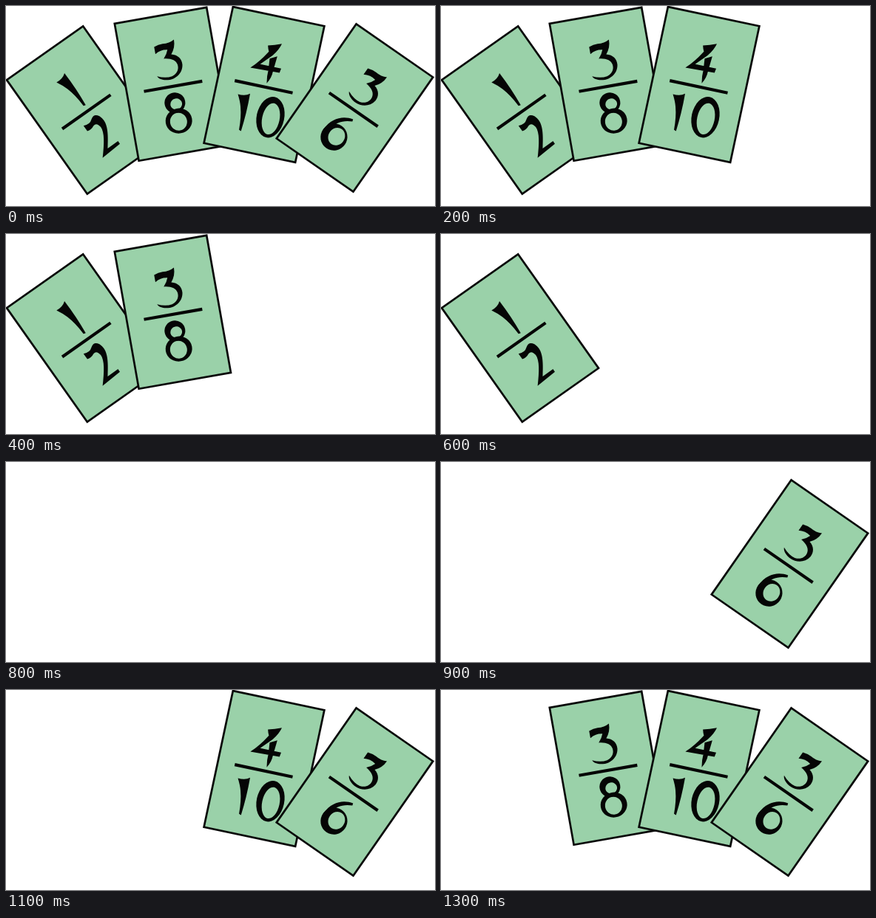
Write an HTML page with a canvas that moves like this. It is 580 px wide and 271 px high and loops after 1.5 s.

```html
<!DOCTYPE html>
<html lang="en">
<head>
<meta charset="utf-8">
<title>Fraction cards</title>
<style>
  html, body { margin: 0; width: 100%; height: 100%; overflow: hidden; background: #fff; }
  canvas { display: block; }
</style>
</head>
<body>
<canvas id="stage" width="580" height="271"></canvas>
<script>
const ctx = document.getElementById('stage').getContext('2d');
const LOOP = 1500;
const CARD_W = 126.3, CARD_H = 188.8;

// Glyph outlines in card coordinates, measured from the card centre.
const shapes = {
  one: 'M-10 -53 Q0 -52 6 -57 Q7 -30 4.5 -5 L1.5 -6 Q1 -24 -3 -37 Q-5 -44 -10 -53 Z',
  two: 'M-14 16 Q-6 20 0 15 Q7 10 11 18 C16 30 9 42 -5 60 L12 60 L12 64.5 L-18 66.5 C-5 52 4 40 4 31 Q3 22 -3 24 Q-9 27 -14 25 Z',
  three: 'M-16 -54 Q-10 -56 -4 -56 Q5 -55 12 -59 Q12 -48 5 -40 C14 -38 18 -31 17.5 -24 C16 -12 5 -6.5 -3 -6.5 C-10 -6.5 -17 -9 -19 -14 Q-8 -9 1 -10.5 C9 -13 12 -19 11 -25 C10 -31 4 -35 -6 -36 Q-1 -41 1 -47 Q-8 -49 -16 -44 Z',
  four: 'M-6 -53 Q3 -55 12 -59 Q10 -50 3 -41 L-11 -26 L18 -26 L17 -20 L-23 -18.5 Q-13 -28 -3 -45 Q-5 -49 -6 -53 Z M0 -36 L9.5 -41 L8 -20 Q8 -10 3 -2.5 Q1 -12 1.5 -20 Z',
  sixTail: 'M-18.3 48 C-18 28 -6 17 7 14 L8 17 C-2 22 -11 30 -11 46 Z'
};
const paths = Object.fromEntries(
  Object.entries(shapes).map(([name, d]) => [name, new Path2D(d)])
);

function ring(x, y, rx, ry, holeX, holeY, holeRx, holeRy) {
  ctx.beginPath();
  ctx.ellipse(x, y, rx, ry, 0, 0, Math.PI * 2);
  ctx.closePath();
  ctx.moveTo(holeX + holeRx, holeY);
  ctx.ellipse(holeX, holeY, holeRx, holeRy, 0, 0, Math.PI * 2);
  ctx.fill('evenodd');
}

function half() {
  ctx.fill(paths.one);
  ctx.fill(paths.two);
}

function threeEighths() {
  ctx.fill(paths.three);
  ring(-1.5, 25.5, 14, 14, 0, 27.5, 8, 7.5);
  ring(-0.5, 50.5, 18, 17, -1, 51.5, 11.5, 12);
}

function fourTenths() {
  ctx.fill(paths.four);
  ctx.save();
  ctx.translate(-22, 73);
  ctx.fill(paths.one);
  ctx.restore();
  ring(17.5, 41.5, 18.7, 28, 18.5, 43.5, 11.8, 21.5);
}

function threeSixths() {
  ctx.fill(paths.three);
  ctx.fill(paths.sixTail);
  ring(-0.5, 48.5, 18, 18.3, 2, 46, 11, 12.3);
}

// Each card is hidden from `leave` until `enter`.
const cards = [
  { x: 107, y: 141, angle: -35.2, leave: 800, enter: 1500, digits: half },
  { x: 225.4, y: 105.8, angle: -10, leave: 600, enter: 1300, digits: threeEighths },
  { x: 349, y: 106.5, angle: 12, leave: 400, enter: 1100, digits: fourTenths },
  { x: 471.5, y: 138, angle: 34.8, leave: 200, enter: 900, digits: threeSixths }
];

function drawCard({ x, y, angle, digits }) {
  const box = [-CARD_W / 2, -CARD_H / 2, CARD_W, CARD_H];
  ctx.save();
  ctx.translate(x, y);
  ctx.rotate(angle * Math.PI / 180);
  ctx.fillStyle = '#9ad1a9';
  ctx.fillRect(...box);
  ctx.strokeStyle = '#080808';
  ctx.lineWidth = 2.7;
  ctx.strokeRect(...box);
  ctx.fillStyle = '#050505';
  ctx.fillRect(-40, 0.9, 80, 4.2);
  digits();
  ctx.restore();
}

function draw(now) {
  const t = now % LOOP;
  ctx.fillStyle = '#fff';
  ctx.fillRect(0, 0, 580, 271);
  for (const card of cards) {
    if (t < card.leave || t >= card.enter) drawCard(card);
  }
}

const start = performance.now();
function tick() {
  draw(performance.now() - start);
  requestAnimationFrame(tick);
}
tick();
</script>
</body>
</html>
```
